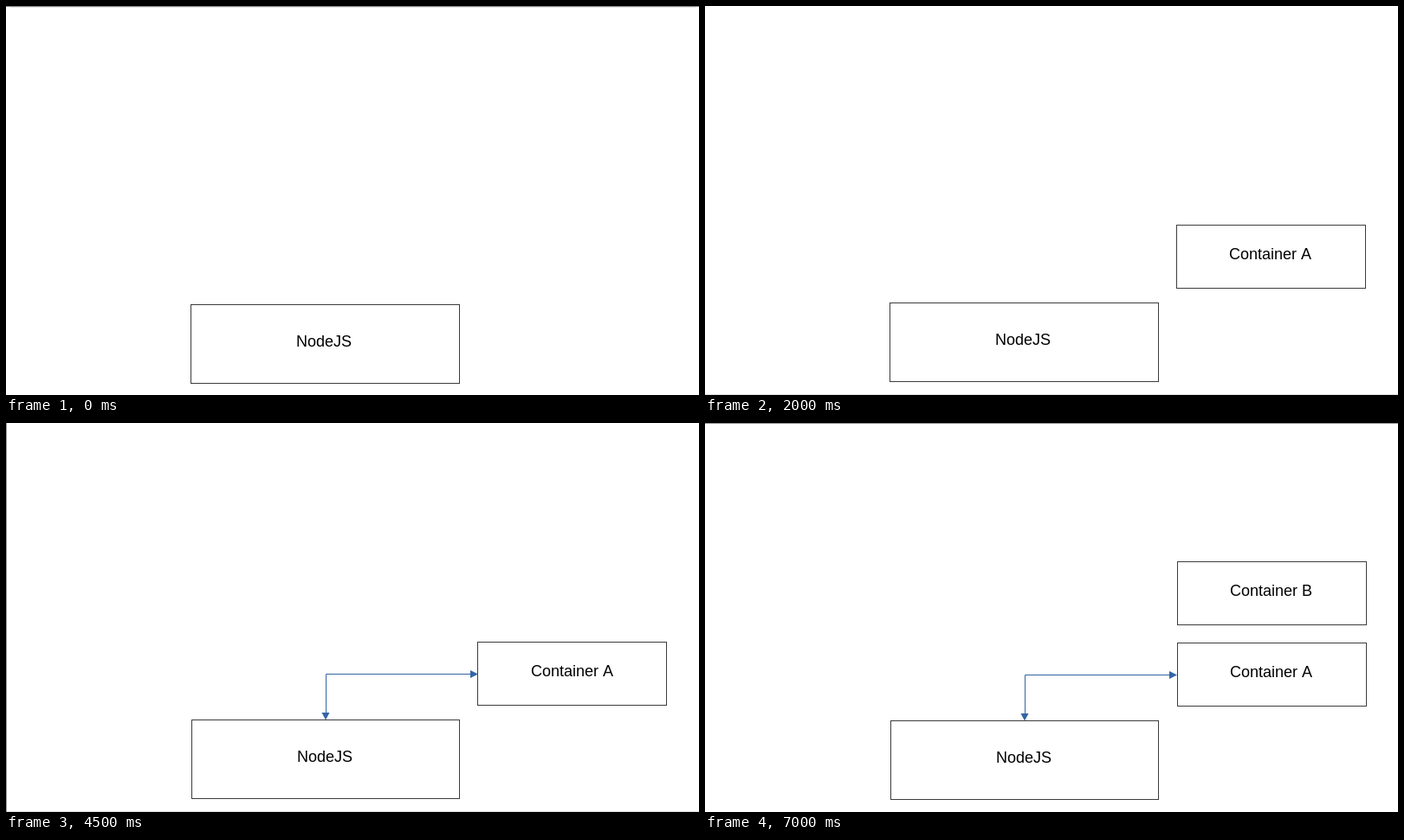
Recreate the animation shown at these times as an HTML page with a canvas. Size 800 px wide and 450 px high, loop 8000 ms.

```html
<!DOCTYPE html>
<html lang="en">
<head>
<meta charset="utf-8">
<title>Container diagram</title>
<style>
  html, body { margin: 0; width: 100%; height: 100%; overflow: hidden; background: #fff; }
  canvas { display: block; }
</style>
</head>
<body>
<canvas id="stage" width="800" height="450"></canvas>
<script>
const ctx = document.getElementById('stage').getContext('2d');
const LOOP = 8000;
const INK = '#3c3c3c';
const BLUE = '#3465a4';

function fill(color, x, y, w, h) {
  ctx.fillStyle = color;
  ctx.fillRect(x, y, w, h);
}

function box(label, left, top, right, bottom, textX, baseline) {
  ctx.strokeStyle = INK;
  ctx.lineWidth = 1;
  ctx.strokeRect(left + 0.5, top + 0.5, right - left, bottom - top);
  ctx.fillStyle = '#000';
  ctx.fillText(label, textX, baseline);
}

function triangle(x1, y1, x2, y2, x3, y3) {
  ctx.beginPath();
  ctx.moveTo(x1, y1);
  ctx.lineTo(x2, y2);
  ctx.lineTo(x3, y3);
  ctx.fill();
}

// Elbow connector with a head at each end; y is the horizontal run.
function connector(y) {
  const x = 369, right = 545, bottom = y + 53;
  ctx.strokeStyle = BLUE;
  ctx.beginPath();
  ctx.moveTo(x + 0.5, bottom - 7);
  ctx.lineTo(x + 0.5, y + 0.5);
  ctx.lineTo(right - 7, y + 0.5);
  ctx.stroke();
  ctx.fillStyle = BLUE;
  triangle(x - 4.5, bottom - 8, x + 4.5, bottom - 8, x, bottom + 0.5);
  triangle(right - 9, y - 4, right - 9, y + 5, right, y + 0.5);
}

const slides = [
  { start: 0, draw() {
    fill('#808080', 0, 0, 800, 1);
    fill('#e4e4e4', 5, 1, 791, 1);
    box('NodeJS', 213, 345, 523, 436, 335, 394);
  } },
  { start: 500, draw() {
    fill('#dedede', 0, 449, 800, 1);
    box('NodeJS', 213, 343, 523, 434, 335, 392);
    box('Container A', 544, 253, 762, 326, 605, 293);
  } },
  { start: 3000, draw() {
    fill('#dedede', 0, 449, 800, 1);
    fill('#999', 0, 0, 1, 450);
    box('NodeJS', 214, 343, 523, 434, 336, 392);
    box('Container A', 544, 253, 762, 326, 606, 293);
    connector(290);
  } },
  { start: 5500, draw() {
    fill('#999', 0, 0, 800, 1);
    box('NodeJS', 214, 344, 523, 435, 336, 393);
    box('Container A', 545, 254, 763, 327, 606, 294);
    box('Container B', 545, 160, 763, 233, 606, 200);
    connector(291);
  } }
];

let origin = null;
function render(now) {
  origin ??= now;
  const t = (now - origin) % LOOP;
  fill('#fff', 0, 0, 800, 450);
  ctx.font = '18px "Liberation Sans", Arial, sans-serif';
  slides.findLast(slide => slide.start <= t).draw();
  requestAnimationFrame(render);
}
requestAnimationFrame(render);
</script>
</body>
</html>
```
